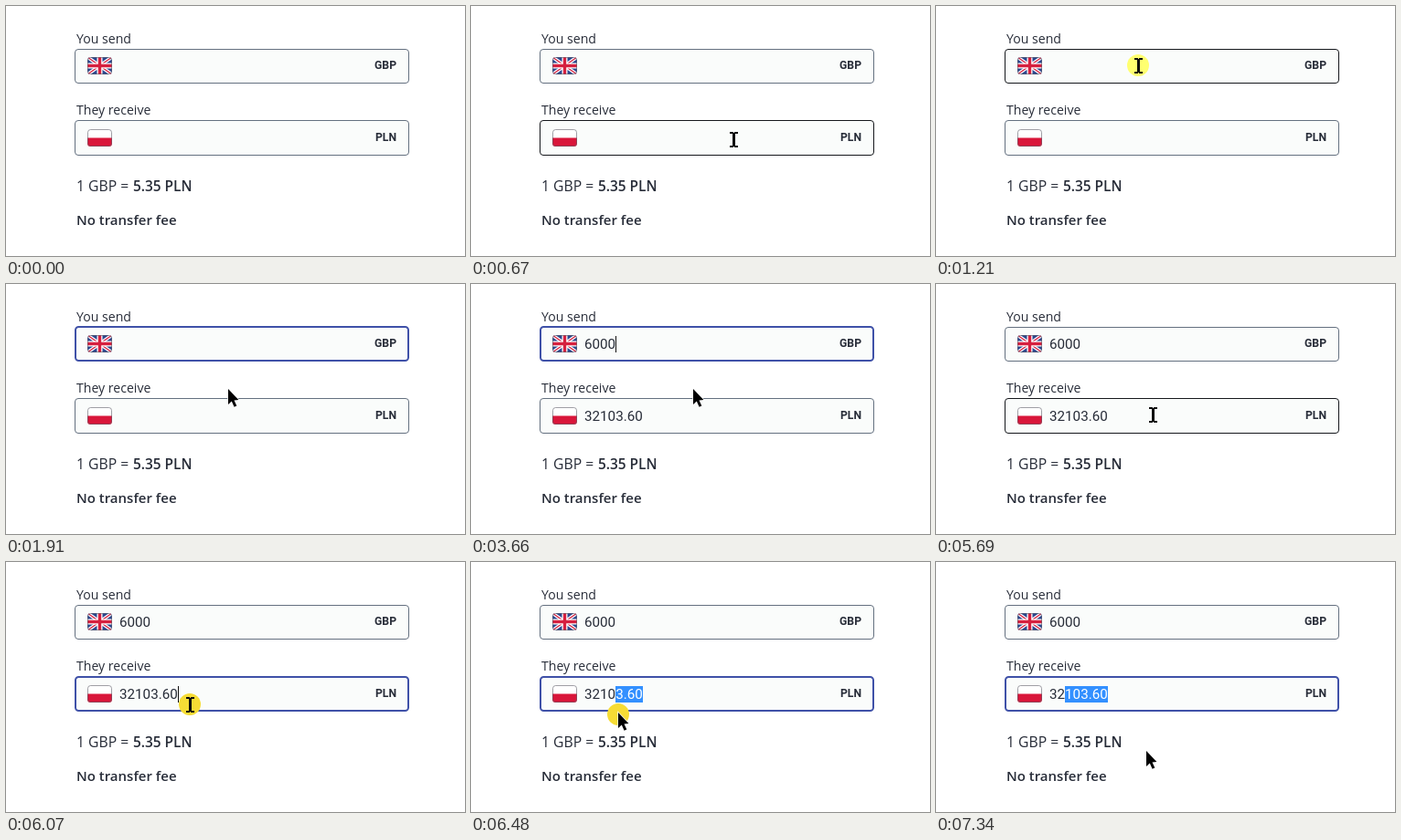
Recreate the animation shown at these times as an HTML page with a canvas. Size 502 px wide and 274 px high, loop 8 s.

```html
<!DOCTYPE html>
<html lang="en">
<head>
<meta charset="utf-8">
<title>Currency transfer form</title>
<style>
  html, body { margin: 0; width: 100%; height: 100%; overflow: hidden; background: #fff; }
  canvas { display: block; width: 502px; height: 274px; }
</style>
</head>
<body>
<canvas id="stage"></canvas>
<script>
const W = 502, H = 274, LOOP = 8000;
const canvas = document.getElementById('stage');
const ctx = canvas.getContext('2d');
const dpr = window.devicePixelRatio || 1;
canvas.width = W * dpr;
canvas.height = H * dpr;

const UI = '"Open Sans", "Noto Sans", sans-serif';
const NUM = 'Roboto, sans-serif';
const INK = '#272c38';
const RATE = 5.3506;
const TEXT_X = 124;
const AMOUNT_FONT = '15.2px ' + NUM;

const send = { x: 75, y: 47, w: 366, h: 38 };
const receive = { x: 75, y: 125, w: 366, h: 39 };

// Pointer moves: start, end, number of discrete steps, destination, optional bend
const moves = [
  { t0: 130, t1: 900, n: 11, to: [221, 65], bend: [330, 215] },
  { t0: 1340, t1: 1340, n: 1, to: [228, 82] },
  { t0: 1610, t1: 1910, n: 5, to: [243, 115] },
  { t0: 5310, t1: 5690, n: 6, to: [237, 143] },
  { t0: 5770, t1: 6070, n: 5, to: [201, 156] },
  { t0: 6150, t1: 6480, n: 5, to: [161, 165] },
  { t0: 6560, t1: 6790, n: 4, to: [140, 172] },
  { t0: 7020, t1: 7340, n: 5, to: [230, 207] }
];
const ENTRY = [441, 262];

const presses = [
  { from: 1000, to: 1340, color: '#ffff70' },
  { from: 5080, to: 5150, color: '#ffff70' },
  { from: 5770, to: 7020, color: '#f6dc35' }
];

const keys = [[2390, '6'], [2970, '60'], [3280, '600'], [3660, '6000']];
const ECHO_DELAY = 80;
const caretSpans = [[1340, 1850], [2390, 4220], [4680, 5080]];

const within = (t, a, b) => t >= a && t < b;
const inside = (p, r) => p && p[0] >= r.x && p[0] < r.x + r.w && p[1] >= r.y && p[1] < r.y + r.h;

function pointerAt(t) {
  if (t < moves[0].t0) return null;
  let pos = ENTRY;
  for (const m of moves) {
    if (t < m.t0) break;
    const gap = (m.t1 - m.t0) / Math.max(1, m.n - 1);
    const k = gap ? Math.min(m.n - 1, Math.floor((t - m.t0) / gap + 1e-6)) : 0;
    const p = m.bend ? k / (m.n - 1) : (k + 1) / m.n;
    const mid = m.bend || [(pos[0] + m.to[0]) / 2, (pos[1] + m.to[1]) / 2];
    const q = 1 - p, from = pos;
    pos = [0, 1].map(i => q * q * from[i] + 2 * q * p * mid[i] + p * p * m.to[i]);
  }
  return pos;
}

function typedAt(t) {
  let text = '';
  for (const [at, value] of keys) if (t >= at) text = value;
  return text;
}

function text(str, x, y, font, color = INK, align = 'left') {
  ctx.font = font;
  ctx.fillStyle = color;
  ctx.textAlign = align;
  ctx.fillText(str, x, y);
}

function roundRect(x, y, w, h, r) {
  ctx.beginPath();
  ctx.roundRect(x, y, w, h, r);
}

function line(x1, y1, x2, y2, color, width) {
  ctx.strokeStyle = color;
  ctx.lineWidth = width;
  ctx.beginPath();
  ctx.moveTo(x1, y1);
  ctx.lineTo(x2, y2);
  ctx.stroke();
}

function field(r, focused, hovered) {
  const b = focused ? 2 : 1;
  const lift = focused && r === send ? 1 : 0;
  roundRect(r.x + b / 2, r.y - lift + b / 2, r.w - b, r.h + lift - b, 3.5);
  ctx.fillStyle = '#fafcfb';
  ctx.fill();
  ctx.strokeStyle = focused ? '#3f51a8' : hovered ? '#15171c' : '#647080';
  ctx.lineWidth = b;
  ctx.stroke();
}

function flag(y, paint) {
  const x = 89, w = 27, h = 19;
  ctx.save();
  roundRect(x, y, w, h, 3.5);
  ctx.clip();
  ctx.translate(x, y);
  paint(w, h);
  ctx.restore();
  roundRect(x + 0.5, y + 0.5, w - 1, h - 1, 3);
  ctx.strokeStyle = 'rgba(95, 95, 105, 0.6)';
  ctx.lineWidth = 1;
  ctx.stroke();
}

function ukFlag(w, h) {
  const red = '#d5203f';
  ctx.fillStyle = '#2b478f';
  ctx.fillRect(0, 0, w, h);
  for (const [color, width] of [['#fff', 3.8], [red, 1.3]]) {
    line(0, 0, w, h, color, width);
    line(w, 0, 0, h, color, width);
  }
  for (const [color, width] of [['#fff', 6], [red, 3.4]]) {
    line(w / 2, 0, w / 2, h, color, width);
    line(0, h / 2, w, h / 2, color, width);
  }
}

function polishFlag(w, h) {
  ctx.fillStyle = '#fff';
  ctx.fillRect(0, 0, w, h);
  ctx.fillStyle = '#d9163a';
  ctx.fillRect(0, h / 2, w, h / 2);
}

function caret(x, y) {
  ctx.fillStyle = '#111';
  ctx.fillRect(Math.round(x), y, 1, 18);
}

function amountWidth(str) {
  ctx.font = AMOUNT_FONT;
  return ctx.measureText(str).width;
}

// Amount with everything from the pointer to the end selected
function receivedAmount(str, selecting, pointerX) {
  const baseline = 150;
  text(str, TEXT_X, baseline, AMOUNT_FONT);
  if (!selecting) return;
  let start = 0, best = Infinity;
  for (let i = 0; i <= str.length; i++) {
    const d = Math.abs(TEXT_X + amountWidth(str.slice(0, i)) - pointerX);
    if (d < best) { best = d; start = i; }
  }
  const end = TEXT_X + amountWidth(str);
  if (start === str.length) return caret(end, 136);
  const x = TEXT_X + amountWidth(str.slice(0, start));
  ctx.fillStyle = '#3390ff';
  ctx.fillRect(Math.round(x), 136, Math.round(end) - Math.round(x), 18);
  text(str.slice(start), x, baseline, AMOUNT_FONT, '#fff');
}

function arrow([x, y]) {
  const shape = [[0, 0], [0, 17], [3.8, 13.4], [6.6, 19.8], [9.3, 18.6], [6.5, 12.4], [11.4, 12]];
  ctx.beginPath();
  shape.forEach(([dx, dy]) => ctx.lineTo(x + dx, y + dy));
  ctx.closePath();
  ctx.strokeStyle = '#fff';
  ctx.lineWidth = 1.4;
  ctx.stroke();
  ctx.fillStyle = '#000';
  ctx.fill();
}

function iBeam([px, py]) {
  const x = Math.round(px), y = Math.round(py);
  ctx.fillStyle = '#0b0b0b';
  ctx.fillRect(x - 1, y - 7, 3, 15);
  for (const dy of [-8, 7]) {
    ctx.fillRect(x - 4, y + dy, 4, 2);
    ctx.fillRect(x + 1, y + dy, 4, 2);
  }
}

function draw(t) {
  ctx.setTransform(dpr, 0, 0, dpr, 0, 0);
  ctx.fillStyle = '#fff';
  ctx.fillRect(0, 0, W, H);

  const pointer = pointerAt(t);
  const sendFocus = within(t, 1340, 5080);
  const receiveFocus = t >= 5770;

  text('You send', 77, 41, '14.1px ' + UI);
  text('They receive', 77, 119, '14.1px ' + UI);
  field(send, sendFocus, inside(pointer, send));
  field(receive, receiveFocus, inside(pointer, receive));
  flag(56, ukFlag);
  flag(135, polishFlag);
  text('GBP', 427, 69, '700 12.2px ' + NUM, INK, 'right');
  text('PLN', 427, 148, '700 12.2px ' + NUM, INK, 'right');

  text('1 GBP =', 77, 203, '15.7px ' + UI);
  text('5.35 PLN', 139, 203, '600 15.4px ' + UI);
  text('No transfer fee', 77, 240, '600 15px ' + UI);

  const typed = typedAt(t);
  text(typed, TEXT_X, 71, AMOUNT_FONT);
  if (caretSpans.some(([a, b]) => within(t, a, b))) caret(TEXT_X + amountWidth(typed), 57);

  const echoed = typedAt(t < 2900 ? t - ECHO_DELAY : t);
  if (echoed) {
    const dragX = pointerAt(Math.min(t, 7000));
    receivedAmount((echoed * RATE).toFixed(2), receiveFocus, dragX && dragX[0]);
  }

  if (!pointer) return;
  const beam = inside(pointer, send) || inside(pointer, receive);
  const press = presses.find(p => within(t, p.from, p.to));
  if (press) {
    ctx.fillStyle = press.color;
    ctx.beginPath();
    ctx.arc(pointer[0], pointer[1] + (beam ? 0 : 2), 12, 0, Math.PI * 2);
    ctx.fill();
  }
  (beam ? iBeam : arrow)(pointer);
}

const begin = performance.now();
function tick() {
  draw((performance.now() - begin) % LOOP);
  requestAnimationFrame(tick);
}
tick();
</script>
</body>
</html>
```
